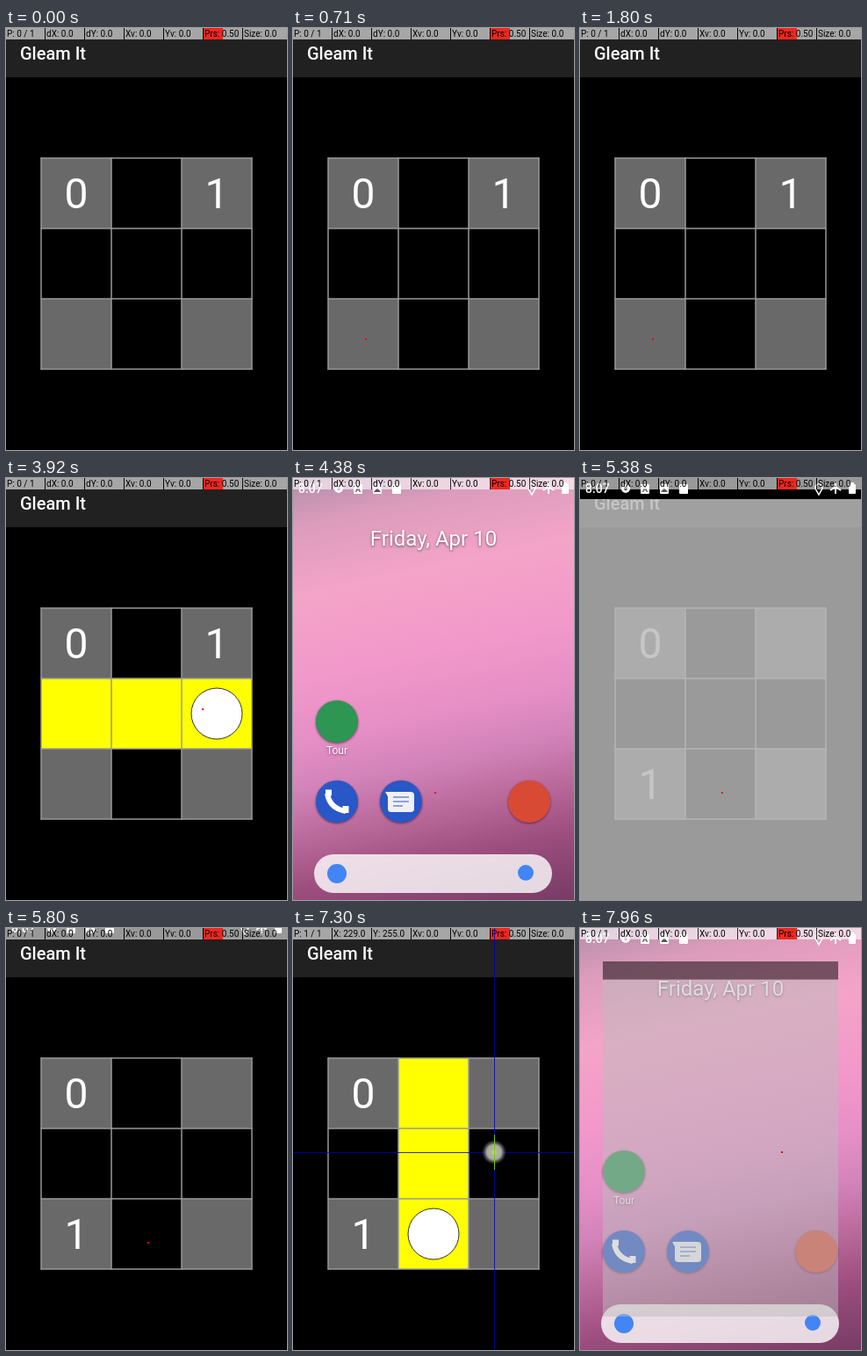
Write an HTML page with a canvas that moves like this. It is 320 by 480 pixels and loops after 8000 ms.

```html
<!DOCTYPE html>
<html lang="en">
<head>
<meta charset="utf-8">
<title>Grid puzzle</title>
<style>
html, body { margin: 0; width: 100%; height: 100%; overflow: hidden; background: #000; }
canvas { display: block; }
</style>
</head>
<body>
<canvas id="stage" width="320" height="480"></canvas>
<script>
const W = 320, H = 480, LOOP = 8000;
const stage = document.getElementById('stage').getContext('2d');
const appCanvas = document.createElement('canvas');
appCanvas.width = W;
appCanvas.height = H;
const app = appCanvas.getContext('2d');

const SPLASH = '#bbb', HEADER = '#212121', LINE = '#999', BLOCK = '#696969', WHITE = '#fff';

// Touches: time, position, whether the crosshair is shown while held
const taps = [
  { at: 50, x: 82, y: 354 },
  { at: 3340, x: 223, y: 263 },
  { at: 3960, x: 161, y: 358, held: true },
  { at: 6590, x: 161, y: 350, held: true },
  { at: 7300, x: 229, y: 255, held: true }
];
// Cells are numbered 0..8 by row; corners are walls
const puzzles = [
  { clues: { 0: '0', 2: '1' }, bulbs: [[3340, 5], [4000, 7]], close: 4000 },
  { clues: { 0: '0', 6: '1' }, bulbs: [[6630, 7], [7340, 5]], close: 7370 }
];
const opens = [4630, 7960];

const easeOut = p => 1 - (1 - p) ** 2;
// Progress from 0 to 1, stepping at 25 frames per second
const progress = (t, start, length) =>
  Math.max(0, Math.min(1, Math.floor((t - start) / 40) * 40 / length));

function rect(c, x, y, w, h, fill) {
  c.fillStyle = fill;
  c.fillRect(x, y, w, h);
}

function disc(c, x, y, r, fill) {
  c.fillStyle = fill;
  c.beginPath();
  c.arc(x, y, r, 0, 7);
  c.fill();
}

function roundRect(c, x, y, w, h, r, fill) {
  c.fillStyle = fill;
  c.beginPath();
  c.roundRect(x, y, w, h, r);
  c.fill();
}

function text(c, str, x, y, size, fill, weight = 400, align = 'left') {
  c.font = `${weight} ${size}px Roboto, sans-serif`;
  c.textAlign = align;
  c.fillStyle = fill;
  c.fillText(str, x, y);
}

function line(c, x1, y1, x2, y2, color, width = 1) {
  c.strokeStyle = color;
  c.lineWidth = width;
  c.beginPath();
  c.moveTo(x1, y1);
  c.lineTo(x2, y2);
  c.stroke();
}

function drawGame(c, puzzle, t) {
  rect(c, 0, 0, W, H, '#000');
  rect(c, 0, 0, W, 56, HEADER);
  text(c, 'Gleam It', 16, 36, 20, WHITE, 500);

  const bulbs = puzzle.bulbs.filter(([at]) => t >= at).map(([, cell]) => cell);
  const rowLit = bulbs.includes(5), columnLit = bulbs.includes(7);
  for (let i = 0; i < 9; i++) {
    const col = i % 3, row = Math.floor(i / 3);
    const wall = col !== 1 && row !== 1;
    const lit = rowLit && row === 1 || columnLit && col === 1;
    rect(c, 40 + col * 80, 148 + row * 80, 80, 80, wall ? BLOCK : lit ? '#ff0' : '#000');
  }
  for (let i = 0; i < 4; i++) {
    line(c, 40 + i * 80, 147.5, 40 + i * 80, 388.5, LINE, 1.5);
    line(c, 39.5, 148 + i * 80, 280.5, 148 + i * 80, LINE, 1.5);
  }
  for (const [cell, clue] of Object.entries(puzzle.clues)) {
    text(c, clue, 80 + cell % 3 * 80, 205 + Math.floor(cell / 3) * 80, 48, WHITE, 400, 'center');
  }
  for (const cell of bulbs) {
    disc(c, 80 + cell % 3 * 80, 188 + Math.floor(cell / 3) * 80, 29, WHITE);
    c.strokeStyle = '#333';
    c.lineWidth = 1;
    c.stroke();
  }
}

function drawSplash(c) {
  rect(c, 0, 0, W, H, SPLASH);
  rect(c, 0, 0, W, 24, '#000');
}

function drawStatus(c) {
  text(c, '8:07', 6, 17, 14, WHITE, 500);
  c.strokeStyle = WHITE;
  c.lineWidth = 3;
  c.beginPath();
  c.arc(52, 12, 3.5, 0, 7);
  c.stroke();
  for (const x of [69, 91, 113]) roundRect(c, x, 7, 10, 11, 1, WHITE);
  text(c, 'A', 74, 16, 9, '#555', 700, 'center');
  c.fillStyle = '#555';
  c.beginPath();
  c.moveTo(92, 16);
  c.lineTo(96, 11);
  c.lineTo(100, 16);
  c.fill();
  c.strokeStyle = WHITE;
  c.lineWidth = 1.5;
  c.beginPath();
  c.arc(272, 11, 4, 2.6, 6.8);
  c.lineTo(272, 19);
  c.closePath();
  c.stroke();
  line(c, 291, 6, 291, 18, WHITE, 2);
  line(c, 285, 14, 291, 10, WHITE, 2);
  line(c, 291, 10, 297, 14, WHITE, 2);
  roundRect(c, 306, 7, 8, 11, 1, WHITE);
  rect(c, 308, 5, 4, 2, WHITE);
}

function drawHome(c) {
  const sky = c.createLinearGradient(104, -20, 216, 500);
  const stops = [[0, '#b48eaa'], [0.1, '#dc9cbc'], [0.25, '#f4a4c8'], [0.42, '#f298ca'],
    [0.55, '#e68fc6'], [0.65, '#d284ba'], [0.75, '#bb6a9c'], [0.86, '#9c4e7e'], [1, '#783c66']];
  for (const [at, color] of stops) sky.addColorStop(at, color);
  rect(c, 0, 0, W, H, sky);

  c.shadowColor = 'rgba(60,20,50,.7)';
  c.shadowBlur = 3;
  c.shadowOffsetY = 1;
  text(c, 'Friday, Apr 10', 160, 77, 24, WHITE, 400, 'center');
  text(c, 'Tour', 50, 314, 12, WHITE, 400, 'center');
  disc(c, 50, 277, 24, '#2d9653');
  disc(c, 50, 368, 24, '#2857c8');
  disc(c, 123, 368, 24, '#2857c8');
  disc(c, 269, 368, 24, '#d94a35');
  c.shadowColor = 'transparent';

  // Handset
  c.strokeStyle = WHITE;
  c.lineWidth = 6;
  c.beginPath();
  c.moveTo(39, 359);
  c.quadraticCurveTo(42, 376, 60, 379);
  c.stroke();
  line(c, 37, 358, 44, 358, WHITE, 7);
  line(c, 60, 373, 60, 381, WHITE, 7);
  // Speech bubble
  roundRect(c, 108, 357, 30, 23, 4, '#f0f0f6');
  c.beginPath();
  c.moveTo(105, 357);
  c.lineTo(116, 357);
  c.lineTo(110, 366);
  c.fill();
  for (const [y, end] of [[363, 132], [368, 132], [373, 125]]) line(c, 114, y, end, y, '#7088c8', 1.5);

  roundRect(c, 24, 428, 271, 44, 22, 'rgba(255,255,255,.8)');
  disc(c, 50, 450, 11, '#4285f4');
  disc(c, 265, 449, 9, '#4285f4');
}

function drawWindow(c, scale, alpha) {
  c.save();
  c.globalAlpha = alpha;
  c.translate(W / 2, H / 2);
  c.scale(scale, scale);
  c.drawImage(appCanvas, -W / 2, -H / 2);
  c.restore();
}

function drawTouchOverlay(c, t) {
  const tap = taps.filter(p => t >= p.at).pop();
  const held = tap && tap.held && t < tap.at + 40;
  const labels = held
    ? ['P: 1 / 1', `X: ${tap.x.toFixed(1)}`, `Y: ${tap.y.toFixed(1)}`]
    : ['P: 0 / 1', 'dX: 0.0', 'dY: 0.0'];
  labels.push('Xv: 0.0', 'Yv: 0.0', 'Prs: 0.50', 'Size: 0.0');
  labels.forEach((label, i) => {
    rect(c, i * 45, 0, i === 6 ? 50 : 44, 13, 'rgba(255,255,255,.6)');
    if (i < 6) rect(c, i * 45 + 44, 0, 1, 13, 'rgba(0,0,0,.75)');
    if (i === 5) rect(c, 225, 0, 22, 13, '#f02820');
    text(c, label, i * 45 + 1, 10, 10, '#000');
  });
  if (held) {
    const { x, y } = tap;
    line(c, 0, y + .5, W, y + .5, 'rgba(0,0,192,.8)');
    line(c, x + .5, 0, x + .5, H, 'rgba(0,0,192,.8)');
    const glow = c.createRadialGradient(x, y, 0, x, y, 14);
    glow.addColorStop(0, '#c4c4c4');
    glow.addColorStop(.6, '#a4a4a4');
    glow.addColorStop(1, 'rgba(100,100,100,0)');
    disc(c, x, y, 14, glow);
    line(c, x + .5, y - 20, x + .5, y + 20, '#78c800');
    c.strokeStyle = '#a0c828';
    c.beginPath();
    c.arc(x, y, 4, 0, 7);
    c.stroke();
  } else if (tap) {
    rect(c, tap.x, tap.y - 1, 2, 2, '#f00000');
  }
}

function render(t) {
  const puzzle = puzzles[t < 4630 ? 0 : 1];
  const opening = opens.filter(at => t >= at).pop();
  const launching = opening !== undefined && (t < 5380 || t >= 7960);
  const closing = progress(t, puzzle.close, 360);

  if (launching) {
    drawHome(stage);
    drawSplash(app);
    const grow = easeOut(progress(t, opening, 280));
    drawWindow(stage, .84 + .16 * grow, .5 + .5 * progress(t, opening, 160));
    drawStatus(stage);
  } else {
    drawGame(app, puzzle, t);
    if (t >= puzzle.close) {
      drawHome(stage);
      stage.globalAlpha = closing;
      drawStatus(stage);
      stage.globalAlpha = 1;
      if (closing < 1) drawWindow(stage, 1 - .16 * easeOut(closing), 1 - closing);
    } else {
      drawSplash(stage);
      drawWindow(stage, 1, t < 5380 ? 1 : .17 + .83 * progress(t, 5380, 160));
      if (t >= 5380 && t < 5920) {
        stage.save();
        stage.translate(0, -24 * progress(t, 5670, 240));
        rect(stage, 0, 0, W, 24, '#000');
        drawStatus(stage);
        stage.restore();
      }
    }
  }
  drawTouchOverlay(stage, t);
}

const began = performance.now();
function tick() {
  render((performance.now() - began) % LOOP);
  requestAnimationFrame(tick);
}
tick();
</script>
</body>
</html>
```
